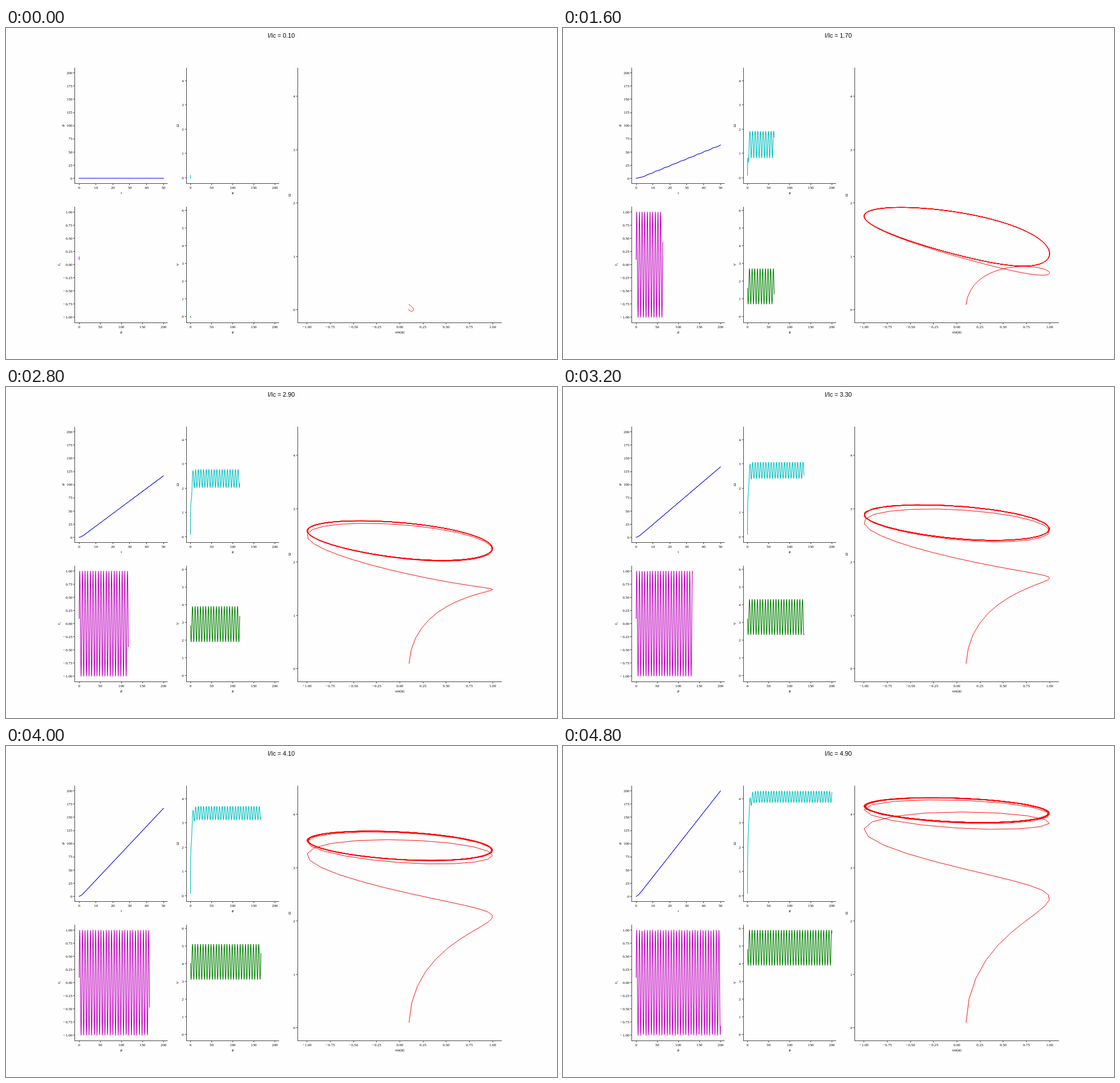
An HTML page with a canvas for the animation above (4900 ms loop, 966 by 580 pixels).

```html
<!DOCTYPE html>
<html lang="en">
<head>
<meta charset="utf-8">
<title>Driven junction</title>
<style>
html, body { margin: 0; width: 100%; height: 100%; overflow: hidden; background: #fefefe; }
canvas { display: block; }
</style>
</head>
<body>
<canvas id="stage" width="966" height="580"></canvas>
<script>
const ctx = document.getElementById('stage').getContext('2d');
const STEPS = 49, STEP_MS = 100, SAMPLES = 500;
const DAMPING = 1.2;
const SERIF = '"Liberation Serif", "DejaVu Serif", serif';
const SANS = '"Liberation Sans", sans-serif';

// Grid: four columns, two rows, gaps of a fifth of a cell
const W = 162.75, H = 203, COL = [120.75, 316.05, 511.35], ROW = [69.6, 313.2];
const PHI = [-10, 210], OMEGA = [-0.239, 4.537], UNIT = [-1.1, 1.1];

const range = (from, to, by) =>
  Array.from({ length: Math.round((to - from) / by) + 1 }, (_, i) => from + i * by);

const phiTicks = range(0, 200, 50), omegaTicks = range(0, 4, 1), unitTicks = range(-1, 1, 0.25);

const plots = [
  { x: COL[0], y: ROW[0], w: W, h: H, xr: [-2.5, 52.5], yr: PHI,
    xt: range(0, 50, 10), yt: range(0, 200, 25), xl: 't', yl: 'ϕ', ylx: 100,
    color: '#0000ff', lw: 1.1, fx: p => p.t, fy: p => p.phi },
  { x: COL[1], y: ROW[0], w: W, h: H, xr: PHI, yr: OMEGA,
    xt: phiTicks, yt: omegaTicks, xl: 'ϕ', yl: 'Ω', ylx: 301,
    color: '#00bfbf', lw: 1.1, fx: p => p.phi, fy: p => p.omega },
  { x: COL[0], y: ROW[1], w: W, h: H, xr: PHI, yr: UNIT,
    xt: phiTicks, yt: unitTicks, yd: 2, xl: 'ϕ', yl: 'I', sub: 's', ylx: 92.5,
    color: '#bf00bf', lw: 1.1, fx: p => p.phi, fy: p => Math.sin(p.phi) },
  { x: COL[1], y: ROW[1], w: W, h: H, xr: PHI, yr: [-0.3475, 6.1975],
    xt: phiTicks, yt: range(0, 6, 1), xl: 'ϕ', yl: 'V', ylx: 301,
    color: '#008000', lw: 1.1, fx: p => p.phi, fy: (p, drive) => drive - Math.sin(p.phi) },
  { x: COL[2], y: ROW[0], w: 2.2 * W, h: 2.2 * H, xr: UNIT, yr: OMEGA,
    xt: unitTicks, xd: 2, yt: omegaTicks, xl: 'sin(ϕ)', yl: 'Ω', ylx: 497,
    color: '#ff0000', lw: 0.95, fx: p => Math.sin(p.phi), fy: p => p.omega }
];

// phi'' + DAMPING * phi' + sin(phi) = drive, integrated with RK4
function solve(drive) {
  const dt = 50 / (SAMPLES - 1), sub = 8, h = dt / sub;
  const acc = (a, v) => drive - DAMPING * v - Math.sin(a);
  let a = 0.1, v = 0.1;
  const path = [];
  for (let i = 0; i < SAMPLES; i++) {
    path.push({ t: i * dt, phi: a, omega: v });
    for (let j = 0; j < sub; j++) {
      const k1 = acc(a, v);
      const v2 = v + h / 2 * k1, k2 = acc(a + h / 2 * v, v2);
      const v3 = v + h / 2 * k2, k3 = acc(a + h / 2 * v2, v3);
      const v4 = v + h * k3, k4 = acc(a + h * v3, v4);
      a += h / 6 * (v + 2 * v2 + 2 * v3 + v4);
      v += h / 6 * (k1 + 2 * k2 + 2 * k3 + k4);
    }
  }
  return path;
}

const sx = (p, v) => p.x + p.w * (v - p.xr[0]) / (p.xr[1] - p.xr[0]);
const sy = (p, v) => p.y + p.h * (p.yr[1] - v) / (p.yr[1] - p.yr[0]);
const snap = v => Math.floor(v) + 0.5;

function text(str, x, y, align, font) {
  ctx.font = font;
  ctx.textAlign = align;
  ctx.fillText(str, x, y);
}

function label(v, digits = 0) {
  return v.toFixed(digits).replace('-', '−\u200a');
}

function line(x1, y1, x2, y2) {
  ctx.beginPath();
  ctx.moveTo(x1, y1);
  ctx.lineTo(x2, y2);
  ctx.stroke();
}

function drawAxes(p) {
  const left = snap(p.x), bottom = snap(p.y + p.h);
  const small = '6.8px ' + SERIF, italic = 'italic 6.8px ' + SERIF;
  ctx.strokeStyle = '#484848';
  ctx.lineWidth = 1;
  ctx.fillStyle = '#000';
  line(left, p.y, left, bottom + 0.5);
  line(left, bottom, p.x + p.w, bottom);
  for (const v of p.xt) {
    const x = sx(p, v);
    line(snap(x), bottom, snap(x), bottom + 2.7);
    text(label(v, p.xd), x, bottom + 9.3, 'center', small);
  }
  for (const v of p.yt) {
    const y = sy(p, v);
    line(left - 2.7, snap(y), left, snap(y));
    text(label(v, p.yd), p.x - 4.4, y + 2.3, 'right', small);
  }
  const plain = p.xl !== 'ϕ';
  text(p.xl, p.x + p.w / 2, bottom + 18, 'center', plain ? small : italic);
  ctx.save();
  ctx.translate(p.ylx + 2.3, p.y + p.h / 2);
  ctx.rotate(-Math.PI / 2);
  text(p.yl, p.sub ? -1 : 0, 0, 'center', p.yl === 'Ω' ? small : italic);
  if (p.sub) text(p.sub, 1.6, 1.2, 'center', 'italic 4.8px ' + SERIF);
  ctx.restore();
}

function drawCurve(p, path, drive) {
  ctx.strokeStyle = p.color;
  ctx.lineWidth = p.lw;
  ctx.lineJoin = 'round';
  ctx.lineCap = 'square';
  ctx.beginPath();
  for (const pt of path) ctx.lineTo(sx(p, p.fx(pt)), sy(p, p.fy(pt, drive)));
  ctx.stroke();
  ctx.lineCap = 'butt';
}

function draw(step) {
  const drive = (step + 1) / 10, path = solve(drive);
  ctx.fillStyle = '#fefefe';
  ctx.fillRect(0, 0, 966, 580);
  for (const p of plots) {
    drawCurve(p, path, drive);
    drawAxes(p);
  }
  text('I/Ic = ' + drive.toFixed(2), 482.5, 17.4, 'center', '10.8px ' + SANS);
}

let shown = -1, start = null;
function tick(now) {
  if (start === null) start = now;
  const step = Math.floor((now - start) / STEP_MS) % STEPS;
  if (step !== shown) draw(shown = step);
  requestAnimationFrame(tick);
}
draw(shown = 0);
requestAnimationFrame(tick);
</script>
</body>
</html>
```
